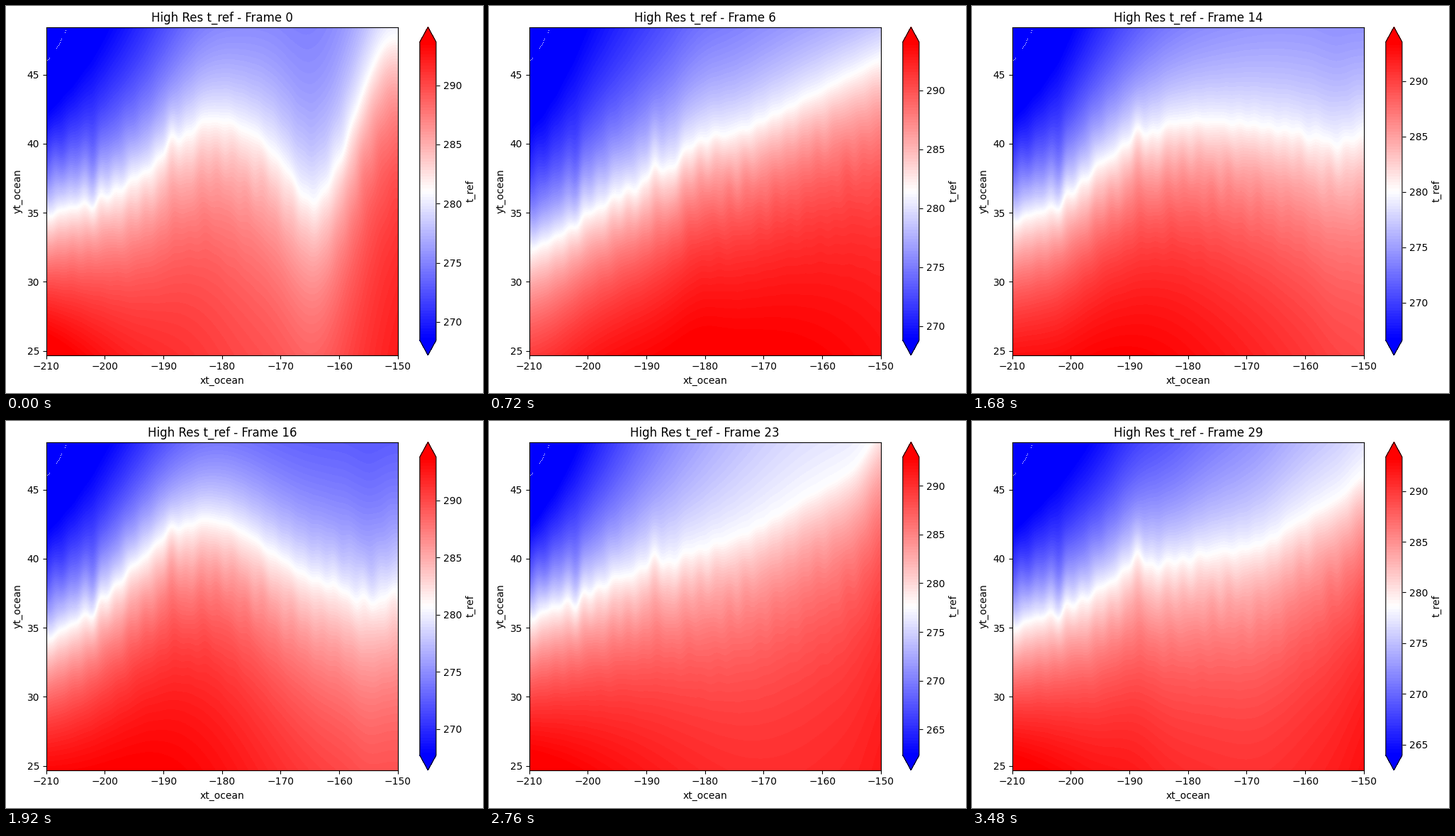
Animation, 673 px wide and 545 px high, one loop 3.6 s. Source, as a matplotlib script:

```python
import numpy as np
import matplotlib.pyplot as plt
from matplotlib.animation import FuncAnimation

W, H, DPI = 673, 545, 100
FRAMES, INTERVAL = 30, 120
WEST, EAST, SOUTH, NORTH = -210, -150, 24.69, 48.44
MAP_W, MAP_H = 496, 462
DEPTH = 8  # degrees over which the air warms or cools away from the front

x = np.linspace(WEST, EAST, MAP_W)
u = (x - x.mean()) / 30
X, Y = np.meshgrid(x, np.linspace(NORTH, SOUTH, MAP_H))


def bump(pos, centre, height, width):
    return height * np.exp(-((pos - centre) / width) ** 2)


def parabola(west, mid, east):
    return mid + (east - west) / 2 * u + ((east + west) / 2 - mid) * u ** 2


poses = {}


def pose(frame, span, line, bends, cold, heat):
    """Tilted front with bends (centre, height, width); strengths west, mid, east."""
    level, tilt = line
    front = level + tilt * u + sum(bump(x, *b) for b in bends)
    poses[frame] = np.array(span), np.array([front, parabola(*cold), parabola(*heat)])


pose(0, (268.45, 293.65), (38.8, 4), [(-183, 3.2, 9), (-164, -5, 6), (-151, 5, 6)],
     cold=(0.82, 0.4, 0.3), heat=(0.75, 0.42, 0.47))
pose(6, (268.8, 294.1), (39.5, 6.6), [(-181, 0.9, 5), (-207, -0.7, 6)],
     cold=(0.75, 0.42, 0.42), heat=(0.61, 0.6, 0.5))
pose(11, (265.0, 293.15), (39.8, 5.2), [(-166, 2.4, 10), (-202, -1.2, 5)],
     cold=(0.85, 0.28, 0.2), heat=(0.6, 0.57, 0.38))
pose(16, (267.7, 293.8), (35.5, 2), [(-184, 7.5, 17), (-155, -0.8, 3)],
     cold=(0.8, 0.5, 0.42), heat=(0.7, 0.52, 0.42))
pose(20, (265.1, 292.6), (38.3, 3.2), [(-176, 2.3, 9), (-149, 6, 4)],
     cold=(0.85, 0.42, 0.25), heat=(0.6, 0.62, 0.45))
pose(25, (260.5, 293.2), (43.5, 7.5), [(-175, -2.9, 10)],
     cold=(0.9, 0.17, 0.12), heat=(0.78, 0.39, 0.48))
pose(29, (263.95, 293.35), (40, 5), [(-189, 1.1, 5), (-168, -1, 7), (-149, 1.2, 4)],
     cold=(0.85, 0.45, 0.2), heat=(0.72, 0.48, 0.5))

KEYS = sorted(poses)


def eddies():
    """North-south wobble of the isotherms that stays in place."""
    rng = np.random.default_rng(4)
    ripple = 0
    for _ in range(8):
        kx, ky, phase = rng.uniform(0.8, 2.6), rng.uniform(-1, 1), rng.uniform(0, 6.28)
        ripple = ripple + np.sin(kx * X + ky * Y + phase)
    tongues = bump(X, -202, -0.8, 0.9) + bump(X, -188.7, 0.6, 0.9) + bump(X, -185.3, -0.4, 1)
    return tongues * bump(Y, 39, 1, 4.5) + 0.06 * ripple * bump(Y, 37, 1, 6)


LAT = Y - eddies()


def weather(n):
    """Colour limits and temperature map at one moment."""
    i = min(np.searchsorted(KEYS, n, side="right"), len(KEYS) - 1)
    a, b = KEYS[i - 1], KEYS[i]
    k = (n - a) / (b - a)
    span, (front, cold, heat) = ((1 - k) * p + k * q for p, q in zip(poses[a], poses[b]))
    d = front - LAT
    strength = np.where(d > 0, heat, cold) * np.sign(d)
    t = 0.5 + strength * (1 - np.exp(-abs(d) / DEPTH))
    low, high = span
    return low, high, low + (high - low) * t


def box(left, bottom, width, height):
    return [left / W, bottom / H, width / W, height / H]


fig = plt.figure(figsize=(W / DPI, H / DPI), dpi=DPI, facecolor="white")
ax = fig.add_axes(box(57, 53, MAP_W, MAP_H))
cax = fig.add_axes(box(57 + MAP_W + 31, 53, MAP_H / 20, MAP_H))

lo, hi, temp = weather(0)
image = ax.imshow(temp, cmap=plt.get_cmap("bwr", 100), vmin=lo, vmax=hi,
                  extent=(WEST, EAST, SOUTH, NORTH), aspect="auto",
                  interpolation="nearest")
fig.colorbar(image, cax=cax, extend="both", label="t_ref")

# specks of missing data along a short coast
s = np.concatenate([np.linspace(0, 0.1, 3), np.linspace(0.5, 0.78, 7), [0.96, 1]])
ax.plot(WEST + 0.2 + 3.1 * s, 46 + 2.15 * s - 0.2 * np.sin(np.pi * s), "w,")

ax.set(xlim=(WEST, EAST), ylim=(SOUTH, NORTH), xlabel="xt_ocean", ylabel="yt_ocean")
ax.set_yticks(range(25, 50, 5))
title = ax.set_title("High Res t_ref - Frame 0")

# leave a margin of 0.1 inch left of and below the labels
tight = fig.get_tightbbox()
dx, dy = (0.1 - tight.x0) * DPI / W, (0.1 - tight.y0) * DPI / H
for axes in (ax, cax):
    axes.set_position(axes.get_position(original=True).translated(dx, dy))


def draw(n):
    low, high, temp = weather(n)
    image.set_data(temp)
    image.set_clim(low, high)
    title.set_text(f"High Res t_ref - Frame {n}")
    return image, title


anim = FuncAnimation(fig, draw, frames=FRAMES, interval=INTERVAL,
                     repeat=True, repeat_delay=0, blit=False)
plt.show()
```
